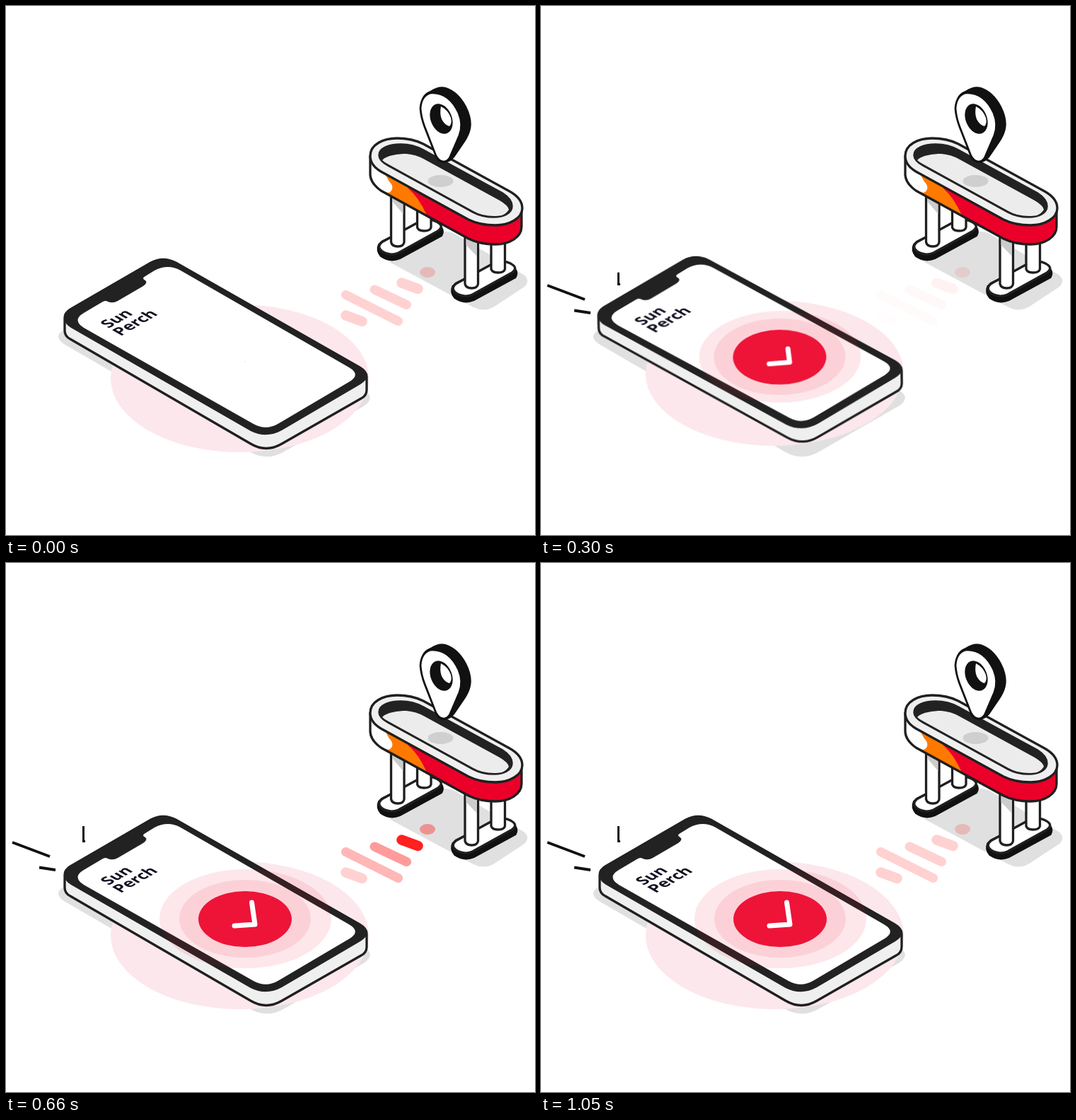
An HTML page that plays this animation: 748x748 px, repeating every 1.65 s.

```html
<!DOCTYPE html>
<html lang="en">
<head>
<meta charset="utf-8">
<title>Phone signal</title>
<style>
  html, body { margin: 0; width: 100%; height: 100%; overflow: hidden; background: #fff; }
  svg { display: block; width: 100%; height: 100%; }
  .line { stroke: #1f1f1f; stroke-width: 3.3; stroke-linejoin: round; }
  .dark { fill: #222; }
  .label { font: 700 22px "Open Sans", "Noto Sans", sans-serif; fill: #101020; }

  .anim, .rays path, .signal > * { animation: 1650ms linear infinite; }

  /* phone and tap feedback */
  .phone { transform-origin: 0 0; animation-name: tilt; animation-timing-function: ease-in-out; }
  .spot { transform-origin: 338px 503px; }
  .halo { fill: #ed1438; fill-opacity: .1; }
  .outer { animation-name: outer; }
  .inner { animation-name: inner; }
  .button { fill: #ed1438; animation-name: button; }
  .check { fill: none; stroke: #fff; stroke-width: 7; stroke-linecap: round; stroke-linejoin: round; animation-name: check; }
  @keyframes tilt {
    0%, 9.1% { transform: matrix(1, 0, 0, 1, 0, 0); }
    17.8% { transform: matrix(1, -.011, .0195, .982, -10.4, 5.75); }
    25.45% { transform: matrix(1, -.0035, .0035, 1, -1.9, 1.5); }
    29.7%, 100% { transform: matrix(1, 0, 0, 1, 0, 0); }
  }
  @keyframes button {
    0% { transform: scale(0); }
    7.27% { transform: scale(.76); }
    10.9%, 100% { transform: scale(1); }
  }
  @keyframes inner {
    0% { transform: scale(0); }
    7.27% { transform: scale(.5); }
    16.4%, 100% { transform: scale(1); }
  }
  @keyframes outer {
    0% { transform: scale(0); }
    7.27% { transform: scale(.38); }
    18.18% { transform: scale(.94); }
    21%, 100% { transform: scale(1); }
  }
  @keyframes check {
    0%, 12% { d: path("M323 513L323 513L323 513"); opacity: 0; }
    12.1% { d: path("M323 513L323 513L323 513"); opacity: 1; }
    15.4% { d: path("M323 513L352 511L352 511"); opacity: 1; }
    18.18% { d: path("M323 513L352 511L350 492"); opacity: 1; }
    22%, 100% { d: path("M323 513L352 511L347.5 480"); opacity: 1; }
  }

  .rays path { fill: none; stroke: #111; stroke-width: 4; stroke-dasharray: 1 2; animation-name: ray; }
  .rays .late { stroke-width: 3; animation-name: lateRay; }
  @keyframes ray {
    0%, 10.9% { stroke-dashoffset: 1; }
    17.5%, 100% { stroke-dashoffset: 0; }
  }
  @keyframes lateRay {
    0%, 11.5% { stroke-dashoffset: 1; }
    18.18% { stroke-dashoffset: .2; }
    20%, 100% { stroke-dashoffset: 0; }
  }

  /* pulse travelling to the table */
  .signal { fill: none; stroke: #ff2020; stroke-linecap: round; stroke-width: 13; }
  .signal .short { stroke-width: 14.5; }
  .signal ellipse { fill: #ff2020; stroke: none; }
  .signal .s1 { animation-name: s1; }
  .signal .s2 { animation-name: s2; }
  .signal .s3 { animation-name: s3; }
  .signal .s4 { animation-name: s4; }
  .signal .s5 { animation-name: s5; }
  @keyframes s1 {
    0% { opacity: .2; } 7.27% { opacity: .13; } 18.8%, 21.2% { opacity: 0; }
    25.45% { opacity: 1; } 32.73% { opacity: .5; } 37%, 100% { opacity: .2; }
  }
  @keyframes s2 {
    0% { opacity: .2; } 7.27% { opacity: .13; } 19.5%, 22.4% { opacity: 0; }
    25.45% { opacity: .7; } 28.2% { opacity: 1; } 32.73% { opacity: .82; } 41.8%, 100% { opacity: .2; }
  }
  @keyframes s3 {
    0% { opacity: .2; } 7.27% { opacity: .13; } 18.18% { opacity: .03; } 22.4%, 27.3% { opacity: 0; }
    32.73% { opacity: .95; } 43.6%, 100% { opacity: .2; }
  }
  @keyframes s4 {
    0% { opacity: .2; } 7.27% { opacity: .15; } 18.18% { opacity: .055; } 26%, 32.73% { opacity: 0; }
    40% { opacity: 1; } 49.1% { opacity: .5; } 54.5%, 100% { opacity: .2; }
  }
  @keyframes s5 {
    0% { opacity: .2; } 18.18% { opacity: .1; } 25.45% { opacity: .04; } 32.73%, 36.4% { opacity: 0; }
    45.5% { opacity: 1; } 49.1% { opacity: .8; } 58.2%, 100% { opacity: .2; }
  }

  .pin { animation-name: hop; }
  @keyframes hop {
    0%, 47.3% { transform: translateY(0); }
    49.1% { transform: translateY(-4.5px); }
    54.5% { transform: translateY(-13px); animation-timing-function: ease-in-out; }
    63.6%, 100% { transform: translateY(0); }
  }
</style>
</head>
<body>
<svg viewBox="0 0 748 748">
  <defs>
    <path id="side" d="M515 212V239Q516 251 530 261L654 329Q670 337 692 337C712 337 729 327 729 312V286L600 230Z"/>
    <clipPath id="sideClip"><use href="#side"/></clipPath>
    <g id="foot">
      <path fill="#111" stroke="#111" stroke-width="2" d="M531 333L592 303L612 309Q621 316 616 325L557 357Q543 363 530 354Q523 346 527 337Z"/>
      <path class="line" fill="#fff" d="M533 333L590 302Q604 301 612 307Q619 312 611 318L555 349Q543 354 532 347Q523 340 533 333Z"/>
      <path class="line" fill="#fff" d="M581.5 255V313Q583 318 591 318Q600 318 601 313V255Z"/>
      <path class="line" fill="#fff" d="M544.5 250V334Q546 340 554 340Q562 340 563 334V250Z"/>
    </g>
  </defs>

  <g fill="#e0e0e0">
    <path d="M82 458Q66 467 82 478L346 631Q368 643 390 632L507 565Q521 555 510 546L300 440Z"/>
    <path d="M542 362L610 322Q622 316 634 322L732 380Q742 388 733 397L692 424Q677 434 661 426Z"/>
  </g>

  <g class="signal">
    <path class="s1 short" d="M480.5 437.5L503.5 446"/>
    <path class="s2" d="M480.5 408.5L554.5 445.5"/>
    <path class="s3" d="M521 401L566.5 422.5"/>
    <path class="s4 short" d="M559.5 391.5L582.5 400"/>
    <ellipse class="s5" cx="596" cy="376.5" rx="11" ry="7.5"/>
  </g>

  <!-- table -->
  <use href="#foot"/>
  <path fill="#ccc" d="M546 264V276L561.500 294V264Z"/>
  <use href="#foot" x="104.5" y="59"/>
  <path fill="#ccc" d="M650.5 328V338L666 354V328Z"/>
  <use href="#side" fill="#eb0029"/>
  <g clip-path="url(#sideClip)">
    <path fill="#ff7900" d="M515 205H540L569 258Q584 271 595 296L515 270Z"/>
    <path fill="#fff" d="M510 205H533L538 241Q541 248 545 252Q549 260 541 264Q530 261 526 268H510Z"/>
  </g>
  <use href="#side" class="line" fill="none"/>
  <path class="line" fill="#efefef" d="M515 212C515 196 533 187 553 187Q574 187 590 195L712 262Q730 272 730 286C730 300 712 310 692 310Q670 310 654 302L530 234Q515 225 515 212Z"/>
  <path class="dark" stroke="#222" stroke-width="1.5" d="M527 211C527 200 542 195 558 195Q576 195 590 203L702 264Q716 273 716 283C716 294 703 299 690 299Q673 299 660 292L540 226Q527 219 527 211Z"/>
  <path fill="#ececec" d="M532 218C538 211 555 209 566 209Q580 210 592 217L698 275Q710 282 711 288C705 297 698 297 690 297Q673 297 661 290L541 224Q535 221 532 218Z"/>
  <ellipse cx="614.5" cy="247.5" rx="18" ry="8.5" fill="#cfcfcf"/>

  <g class="pin anim">
    <path fill="#111" d="M587 138Q588 124 600 120Q612 112 622 115Q640 121 651 142Q660 160 657 174Q655 183 649 192L634 214Q627 222 618 222Q610 220 607 213Z"/>
    <path fill="#fff" stroke="#111" stroke-width="2.8" d="M600 123Q587 127 586 145Q587 158 592 171L608 212Q614 223 623 219Q627 217 629 211L641 183Q647 168 640 151Q626 121 600 123Z"/>
    <ellipse cx="615.5" cy="159.5" rx="15" ry="22" fill="#111" transform="rotate(-22 615.5 159.5)"/>
    <path fill="#fff" d="M615 142Q625 147 629 158Q631 166 627 170Q620 168 616 160Q613 152 615 142Z"/>
  </g>

  <g class="rays">
    <path pathLength="1" d="M62 415L9 395"/>
    <path pathLength="1" d="M70 434L47 430.5"/>
    <path pathLength="1" class="late" d="M112 393.5H109.5V372"/>
  </g>

  <g class="phone anim">
    <ellipse cx="330.5" cy="526.5" rx="182.5" ry="104.5" fill="#fce7ec"/>
    <path class="line" fill="#efefef" d="M83 441Q83 434 91 429L205 363Q222 354 240 363L500 511Q510 517 510 524V543Q510 551 502 555L390 619Q368 632 346 619L91 471Q83 467 83 459Z"/>
    <path class="dark" d="M82 441Q82 434 91 429L205 363Q222 354 240 363L500 511Q511 517 511 524Q510 529 501 535L390 600Q368 612 346 601L92 455Q83 450 82 441Z"/>
    <path fill="#fff" d="M110 434L137 418Q141 416 144 418Q151 421 158 417L194 396Q201 391 197 388Q191 385 197 382L210 374Q229 364 247 374L485 511Q502 521 486 531L386 590Q368 601 350 591L110 455Q93 444 110 434Z"/>
    <text class="label" transform="matrix(.866 -.5 .866 .5 145 456)">Sun</text>
    <text class="label" transform="matrix(.866 -.5 .866 .5 162 467)">Perch</text>
    <ellipse class="halo spot outer anim" cx="338.5" cy="503" rx="121.5" ry="70"/>
    <ellipse class="halo spot inner anim" cx="338" cy="503" rx="93" ry="55"/>
    <ellipse class="button spot anim" cx="338" cy="503.5" rx="66" ry="39.5"/>
    <path class="check anim" d="M323 513L352 511L347.5 480"/>
  </g>
</svg>
</body>
</html>
```
